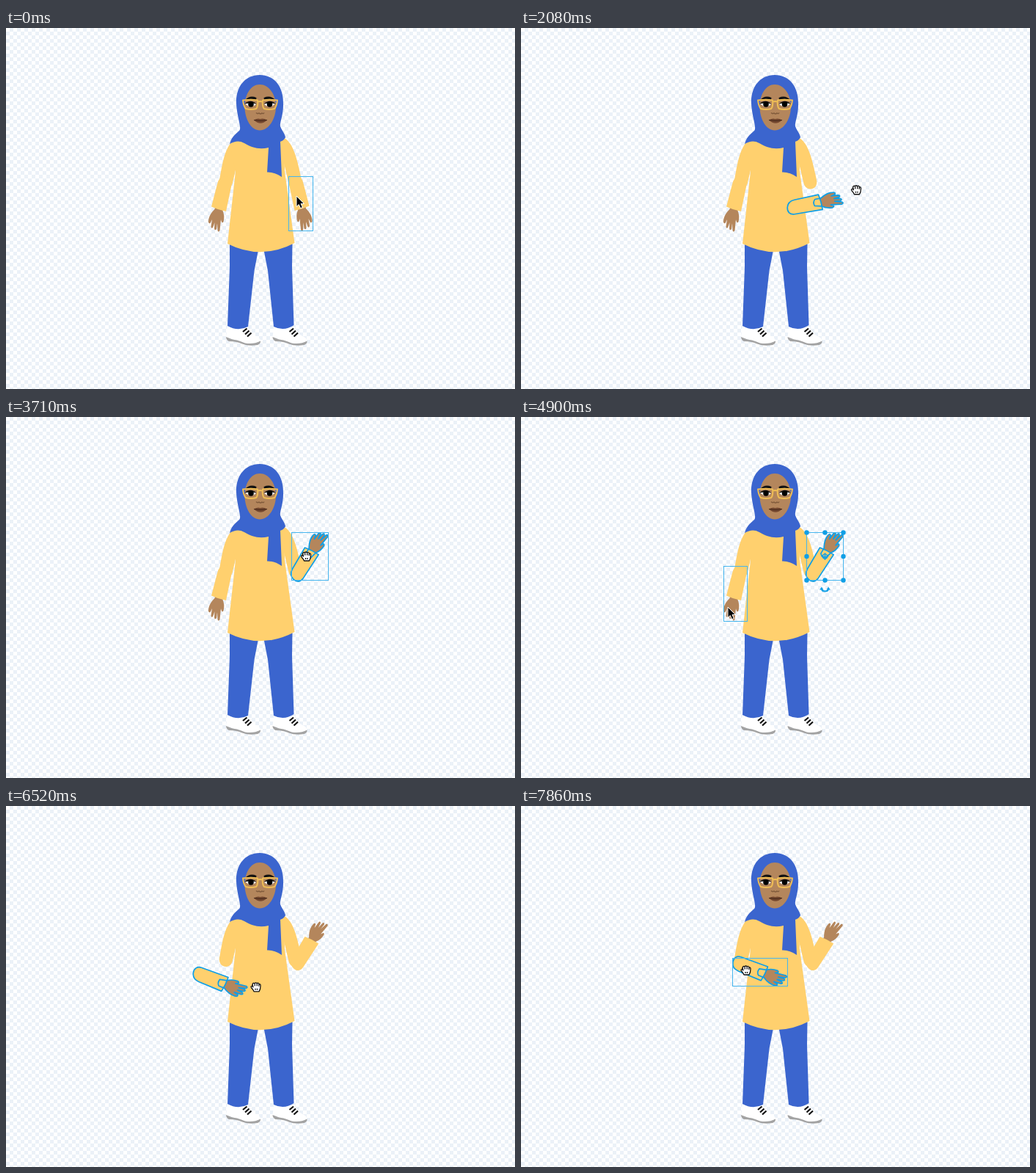
An HTML page for the animation above (8000 ms loop, 694 by 492 pixels).

```html
<!DOCTYPE html>
<html lang="en">
<head>
<meta charset="utf-8">
<title>Posing a figure</title>
<style>
html, body { margin: 0; width: 100%; height: 100%; overflow: hidden; }
body { background: repeating-conic-gradient(#ebf1f8 0 25%, #fff 0 50%) 0 0 / 10px 10px; }
svg { display: block; width: 100%; height: 100%; }
.blue { fill: #3b65ce; }
.yellow { fill: #ffd06e; }
.skin { fill: #b4865c; }
.outline { fill: none; stroke: #0f9fe6; stroke-width: 1.7; stroke-linejoin: round; }
.box { fill: none; stroke: #45b5ee; stroke-width: 1; }
.handle { fill: #0f9fe6; }
</style>
</head>
<body>
<svg viewBox="0 0 694 492">
  <defs>
    <path id="hand" d="M287 239Q291 236 296 239L296 249Q299 256 297 264Q295 267 294 263L293.5 261L292 276Q290 279 289 276L288.5 266L287.5 274Q285 277 284.5 273L285 265L282.5 272Q280 274 280 270L281.5 261L279 266Q276 267 276.5 263C277 256 281 251 285 247Z"/>
    <path id="sleeve" d="M280.5 243.5L289 211C291 204 296 202 300 202C306 202 309.5 206 308.5 212L300.5 250Q290 248 280.5 243.5Z"/>
    <g id="forearm">
      <use href="#hand" class="skin"/>
      <use href="#sleeve" class="yellow"/>
    </g>
    <g id="forearmOutline" class="outline">
      <use href="#hand"/>
      <use href="#sleeve"/>
    </g>
    <g id="shoe">
      <path fill="#fff" d="M302 406L300 421Q311 425 320 429Q334 433 347 427Q347 422 339 419Q333 416 330 407Q316 413 302 406Z"/>
      <path fill="#a3a3a3" d="M300 421Q309 425 315 425.5Q320 427 326 429.5Q338 431.500 347 426.5Q347.500 430 343 432Q331 434 322 430.5Q315 427 304 427Q300 425 300 421Z"/>
      <path stroke="#111" stroke-width="2.2" d="M323 414L328.500 409.500M326 417.500L331.500 412.500M329 420.500L334.500 415.500"/>
    </g>
  </defs>

  <use href="#shoe"/>
  <use href="#shoe" x="63.5"/>
  <path class="blue" d="M305 293L344.500 300L338.500 331L330 407Q316 414 302 406L305 326ZM390.500 293L351 300L357 331L365 407Q379 414 392.500 405L390 326Z"/>
  <g class="yellow">
    <path d="M306 157C297 170 295 185 291 207C290 214 294 219 300 219C305 219 308 215 309 211L315 185Z"/>
    <path d="M378 149C390 155 396 172 403 207C404.500 215 400 219.500 395 219.500C389 219.500 386 215 385 210L378 180Z"/>
    <path d="M305 158Q320 146 346 150L379 152L380 195L393.500 293Q348 317 302 294L313 195Z"/>
  </g>

  <path class="blue" d="M346 64C366 64 379 80 378 105C378 120 373 128 374 134C376 140 380 143 381 149C379 153 376 154 374 155L376 203Q366 196 356 196.500L358 163C345 166 335 163 325 157C318 153 312 154 305 158C307 150 311 146 318 140C322 137 315 122 314 103C313 80 326 64 346 64Z"/>
  <path class="skin" d="M346 77C358 77 368 90 368 107C368 124 358 139.500 346 139.500C334 139.500 325.500 124 325.500 107C325.500 90 334 77 346 77Z"/>
  <path fill="#111" d="M326 98.500Q332 91 341.500 95L341 98Q333 95.500 326 98.500ZM367.500 98.500Q361 91 351.500 95L352 98Q360 95.500 367.500 98.500Z"/>
  <path fill="#fff" d="M326 103Q334 98 341 104Q334 111 326 103ZM352 104Q359 98 367 103Q360 111 352 104Z"/>
  <path fill="#111" d="M325 103.500Q333 96 341.500 103.500Q334 101.500 325 103.500ZM351.500 103.500Q360 96 368 103.500Q360 101.500 351.500 103.500Z"/>
  <circle cx="334" cy="104" r="3.800"/>
  <circle cx="359.500" cy="104" r="3.800"/>
  <path fill="none" stroke="#efbd55" stroke-width="2" stroke-linejoin="round" d="M323 98.500Q334 97 343 98.500Q344 107 341 110Q334 112 327 110Q324 107 323 98.500ZM350 98.500Q359 97 370 98.500Q369 107 366 110Q359 112 352 110Q349 107 350 98.500ZM343 101Q346.500 99 350 101"/>
  <path fill="none" stroke="#815b3c" stroke-width="1.500" d="M341 115.500Q343 117.500 345 116Q347 118 349 116Q351 117.500 352 115.500"/>
  <path fill="#74482f" d="M338 125.500Q343 122.500 346.500 124Q351 122.500 356 125.500Q347 134 338 125.500Z"/>
  <path fill="none" stroke="#432619" d="M338 125.500Q347 127.500 356 125.500"/>

  <g id="rightArm"><use href="#forearm" transform="scale(-1 1) translate(-292.5 -240)"/></g>
  <g id="leftArm"><use href="#forearm" transform="translate(-292.5 -240)"/></g>
  <g id="outline"><use id="mirrored" href="#forearmOutline"/></g>
  <rect id="selBox" class="box"/>
  <g id="handles"></g>
  <rect id="hoverBox" class="box"/>
  <path id="arrow" stroke="#fff" d="M0 0V14.500L3.300 11.500L5.600 16.700L8.300 15.500L6 10.500H10.500Z"/>
  <g id="grab" stroke="#111" stroke-width="1.300" stroke-linejoin="round">
    <path fill="#fff" d="M-4.500 -3.500Q-3.500 -6.500 -1.500 -5Q0 -7 1.700 -5Q3.500 -6.500 4.500 -4Q6.700 -4.500 6.500 -1.500Q6.500 3 4.500 6H-2.500Q-3.500 3.500 -6 1Q-7.500 -2 -4 -1Z"/>
    <path fill="none" d="M-4.500 -3.500L-3.500 .5M-1.300 -4.500V-1.500M1.700 -4.500V-1.500M4.300 -4V-1M-.5 2V4M2 2V4"/>
  </g>
</svg>
<script>
const LOOP = 8000, FIRST = 589, TICK = 148.15;
const LAG = 2, DRAG = 5;
const $ = id => document.getElementById(id);

// Each arm is pressed, rotated by its handle, then grabbed and dragged.
// press, rotate, turned, grab and drop are counted in ticks.
const right = {
  el: $('rightArm'), flip: -1, home: [401.5, 239], hover: [-5.5, -10], grip: [-4.5, 1],
  turn: 135, shift: [12, -50], size: [33, 74], turnedSize: [50, 65],
  press: 0, rotate: 5, turned: 12, grab: 17, drop: 24
};
const left = {
  el: $('leftArm'), flip: 1, home: [292, 240], hover: [-10, 19], grip: [-19, -1.5],
  turn: 82, shift: [33.5, -14.5], size: [32, 75], turnedSize: [75, 38],
  press: 30, rotate: 35, turned: 40, grab: 45, drop: Infinity
};

const add = (a, b) => a.map((v, i) => v + b[i]);
const mix = (a, b, p) => a.map((v, i) => v + (b[i] - v) * p);
const progress = (t, from, to) => Math.min(1, Math.max(0, (t - from) / (to - from)));
const ease = p => p * p * (3 - 2 * p);
const show = (el, on) => { el.style.display = on ? '' : 'none'; };
const place = (el, [x, y], angle = 0) =>
  el.setAttribute('transform', `translate(${x} ${y}) rotate(${angle})`);

const angleOf = (arm, step) =>
  -arm.turn * ease(progress(step, arm.rotate + LAG, arm.turned));

// The drag follows a quarter arc: sideways first, then upwards.
function centreOf(arm, step) {
  const a = progress(step, arm.grab - 1, arm.grab - 1 + DRAG) * Math.PI / 2;
  return add(arm.home, [arm.shift[0] * Math.sin(a), arm.shift[1] * (1 - Math.cos(a))]);
}

function modeOf(arm, step) {
  if (step < arm.press) return 'hover';
  if (step === arm.press) return 'drag';
  if (step < arm.rotate) return 'handles';
  if (step <= arm.turned) return 'rotate';
  return step >= arm.grab && step < arm.drop ? 'drag' : 'handles';
}

// The pointer circles the arm while its rotation handle is held.
function orbit(arm, step) {
  const p = progress(step, arm.rotate, arm.turned);
  const a = Math.PI / 2 - ease(p) * arm.turn * Math.PI / 180;
  const r = 49 + 12 * Math.sin(Math.PI * p);
  return add(arm.home, [r * Math.cos(a), r * Math.sin(a)]);
}

function cursorAt(arm, step) {
  const hover = add(arm.home, arm.hover);
  if (arm === right && step > right.drop) {
    const from = add(centreOf(right, step), right.grip);
    return mix(from, add(left.home, left.hover), ease(progress(step, right.drop, left.press - 1)));
  }
  if (step < arm.rotate) {
    return mix(hover, orbit(arm, step), ease(progress(step, arm.press + 1, arm.rotate - 1)));
  }
  const grip = add(centreOf(arm, step), arm.grip);
  return mix(orbit(arm, step), grip, ease(progress(step, arm.turned, arm.grab - 1)));
}

function setBox(el, [cx, cy], [width, height]) {
  const x = Math.round(cx - width / 2) + .5, y = Math.round(cy - height / 2) + .5;
  Object.entries({ x, y, width, height }).forEach(([k, v]) => el.setAttribute(k, v));
  return [x, y];
}

function handleMarkup([x, y], [w, h]) {
  let dots = '';
  for (const i of [0, .5, 1]) for (const j of [0, .5, 1]) {
    if (i !== .5 || j !== .5) dots += `<circle class="handle" cx="${x + w * i}" cy="${y + h * j}" r="3.2"/>`;
  }
  const cx = x + w / 2;
  return dots +
    `<g class="outline" style="stroke-width:1.2" transform="translate(${cx} ${y + h / 2})">` +
    '<circle r="3.2"/><path d="M-5 0H5M0 -5V5"/></g>' +
    `<g transform="translate(${cx} ${y + h + 12})">` +
    '<path class="outline" style="stroke-width:2" d="M-4.5 0Q-4 3 0 3Q4 3 4.5 0"/>' +
    '<path class="handle" d="M-7.5 1L-4.5 -3L-2 1ZM7.5 1L4.5 -3L2 1Z"/></g>';
}

function draw(time) {
  const step = Math.max(-1, Math.floor((time % LOOP - FIRST) / TICK));
  for (const arm of [right, left]) place(arm.el, centreOf(arm, step), angleOf(arm, step));

  const arm = step < left.press ? right : left;
  const mode = modeOf(arm, step), centre = centreOf(arm, step);
  const size = step > arm.turned - 1 ? arm.turnedSize : arm.size;
  place($('outline'), centre, angleOf(arm, step));
  $('mirrored').setAttribute('transform', `scale(${arm.flip} 1) translate(-292.5 -240)`);
  const corner = setBox($('selBox'), centre, size);
  $('handles').innerHTML = mode === 'handles' ? handleMarkup(corner, size) : '';
  setBox($('hoverBox'), left.home, left.size);
  show($('outline'), mode !== 'hover');
  show($('selBox'), mode !== 'rotate');
  show($('hoverBox'), step === left.press - 1);

  const held = mode === 'drag' || mode === 'rotate';
  const cursor = cursorAt(arm, step);
  place($('arrow'), cursor);
  place($('grab'), cursor);
  show($('arrow'), !held);
  show($('grab'), held);
}

let start;
function tick(now) {
  start ??= now;
  draw(now - start);
  requestAnimationFrame(tick);
}
draw(0);
requestAnimationFrame(tick);
</script>
</body>
</html>
```
